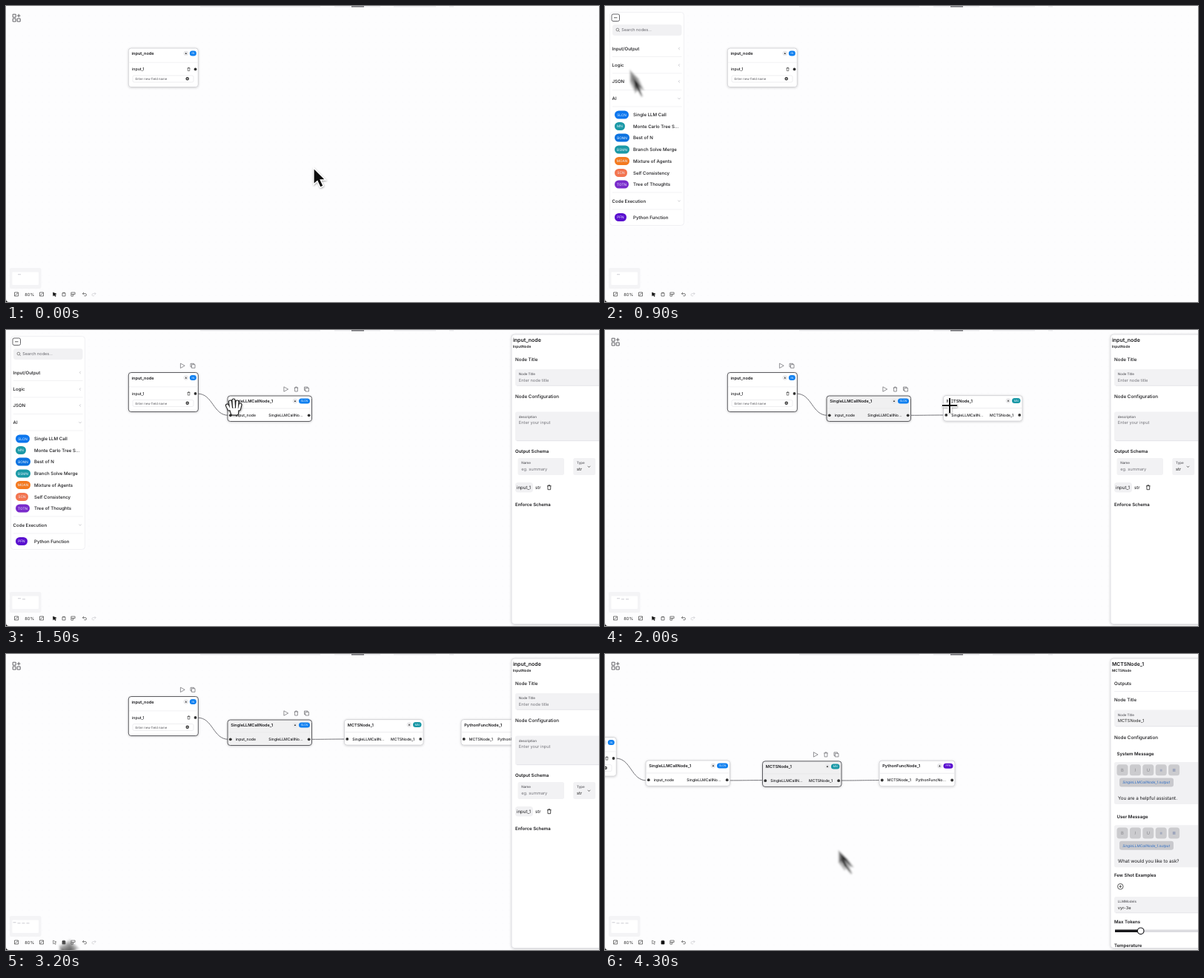
Animation, 800 px wide and 400 px high, one loop 4.4 s. Source, as an HTML page:

```html
<!DOCTYPE html>
<html lang="en">
<head>
<meta charset="utf-8">
<title>Node editor</title>
<style>
html, body { margin: 0; width: 100%; height: 100%; overflow: hidden; background: #fdfdfe; }
svg { display: block; width: 100vw; height: 100vh; }
text { font-family: Inter, "Liberation Sans", sans-serif; text-rendering: geometricPrecision; }
</style>
</head>
<body>
<svg id="stage" viewBox="0 0 800 400" preserveAspectRatio="none"></svg>
<script>
const STEP = 100, STEPS = 44;
const stage = document.getElementById('stage');

// Pointer path: step, shape, x, y
const POINTER = [
  [0, 'arrow', 415, 219], [1, 'arrow', 415, 219], [5, 'arrow', 14, 17], [6, 'arrow', 14, 17],
  [8, 'arrow', 26, 70], [9, 'arrow', 36, 91], [10, 'hand', 40, 138], [11, 'hand', 200, 150],
  [12, 'hand', 415, 160], [13, 'cross', 422, 184], [14, 'hand', 300, 103], [15, 'hand', 296, 92],
  [16, 'hand', 30, 152], [17, 'hand', 455, 90], [18, 'arrow', 14, 17], [19, 'cross', 412, 115],
  [20, 'cross', 465, 102], [21, 'arrow', 400, 90], [24, 'arrow', 14, 17], [25, 'arrow', 14, 17],
  [26, 'arrow', 32, 110], [27, 'hand', 36, 163], [28, 'hand', 40, 215], [29, 'hand', 45, 275],
  [30, 'hand', 330, 200], [31, 'hand', 612, 92], [32, 'arrow', 78, 387], [33, 'hand', 450, 130],
  [34, 'hand', 300, 164], [35, 'hand', 322, 151], [36, 'hand', 370, 150], [40, 'arrow', 440, 230],
  [42, 'arrow', 326, 278], [43, 'arrow', 318, 268]
];
const HOVER = { 10: 0, 16: 1, 27: 5, 29: 7 };
const BLUE = '#1080f0', TEAL = '#1b99a6', INDIGO = '#5a0fcf';
const ITEMS = [
  ['SLCN', 19, '#0b76ee', 'Single LLM Call', 147], ['MN', 14, TEAL, 'Monte Carlo Tree S...', 162.5],
  ['BONN', 20, '#0b72e0', 'Best of N', 178], ['BSMN', 20, TEAL, 'Branch Solve Merge', 194],
  ['MOAN', 20, '#f47a20', 'Mixture of Agents', 209.5], ['SCN', 17, '#f37550', 'Self Consistency', 225.5],
  ['TOTN', 19, '#7a2bcb', 'Tree of Thoughts', 241], ['PFN', 16, INDIGO, 'Python Function', 285.5]
];
const SECTIONS = [['Input/Output', 57.5, 0], ['Logic', 80, 0], ['JSON', 102, 0], ['AI', 125, 1], ['Code Execution', 263.5, 1]];

const ICONS = {
  play: 'M-2.6-3.2L3.2 0L-2.6 3.2Z',
  trash: 'M-2.7-2H2.7M-1-2V-3H1V-2M-2-2L-1.8 3H1.8L2-2',
  copy: 'M-1.6-1.6H3V3H-1.6ZM-1.6 1.5H-3V-3H1.5V-1.6',
  slash: 'M-2.5-2.5H2.5V2.5H-2.5ZM-2 2L2-2',
  palm: 'M-2-1.5V2.5H2V-1.5ZM-1.2-1.5V-2.6M0-1.5V-2.8M1.2-1.5V-2.6',
  frames: 'M-2.6-2.4H2.6V0H-2.6ZM-2.6 0V2.6H0V0',
  undo: 'M-1-2.4L-2.6-.8L-1 .8M-2.6-.8H1Q2.5-.8 2.5 1Q2.5 2.3 1 2.3H-.5',
  redo: 'M1-2.4L2.6-.8L1 .8M2.6-.8H-1Q-2.5-.8-2.5 1Q-2.5 2.3-1 2.3H.5',
  pick: 'M-2-2.5L2.5-.6L.5.3L1.8 2.3L.9 2.8L-.4.9L-1.8 2.1Z',
  left: 'M.8-1.6L-.8 0L.8 1.6', down: 'M-1.7-.8L0 .8L1.7-.8',
  lens: 'M1.8 0A1.9 1.9 0 1 1-2 0A1.9 1.9 0 1 1 1.8 0M1.3 1.4L2.8 2.9',
  plus: 'M-1.8 0H1.8M0-1.8V1.8',
  bin: 'M-1.8-1.4H1.8M-.7-1.4V-2.2H.7V-1.4M-1.4-1.4L-1.2 2.2H1.2L1.4-1.4',
  apps: 'M-5-4.8H-1V-.8H-5ZM-5 1H-1V5H-5ZM1 1H5V5H1ZM3-5.2V-.6M.7-2.9H5.3'
};

const text = (x, y, str, size = 6, weight = 400, fill = '#17171a', more = '') =>
  `<text x="${x}" y="${y}" font-size="${size}" font-weight="${weight}" fill="${fill}" ${more}>${str}</text>`;
const rect = (x, y, w, h, r, fill, more = '') =>
  `<rect x="${x}" y="${y}" width="${w}" height="${h}" rx="${r}" fill="${fill}" ${more}/>`;
const circle = (x, y, r, fill, more = '') => `<circle cx="${x}" cy="${y}" r="${r}" fill="${fill}" ${more}/>`;
const line = (x1, y, x2, color = '#e6e6ea', w = .7) =>
  `<path d="M${x1} ${y}H${x2}" stroke="${color}" stroke-width="${w}"/>`;
const icon = (name, x, y, color = '#444', w = .7, fill = 'none') =>
  `<path d="${ICONS[name]}" transform="translate(${x} ${y})" fill="${fill}" stroke="${color}" stroke-width="${w}" stroke-linejoin="round"/>`;
const pill = (x, y, w, h, color, label, size) => rect(x, y - h / 2, w, h, h / 2, color) +
  text(x + w / 2, y + size * .36, label, size, 400, '#e8f2ff', 'text-anchor="middle"');
const edge = (x1, y1, x2, y2) => {
  const mid = (x1 + x2) / 2;
  return `<path d="M${x1} ${y1}C${mid} ${y1} ${mid} ${y2} ${x2} ${y2}" fill="none" stroke="#66666b" stroke-width=".9"/>`;
};

const DEFS = `<defs>
  <pattern id="dots" width="9" height="9" patternUnits="userSpaceOnUse"><circle cx="4" cy="4" r=".45" fill="#eeeef2"/></pattern>
  <filter id="shadow" x="-20%" y="-40%" width="140%" height="180%"><feDropShadow dx="0" dy=".6" stdDeviation="1.4" flood-opacity=".2"/></filter>
  <filter id="soft" x="-50%" y="-50%" width="200%" height="200%"><feGaussianBlur stdDeviation="1.1"/></filter>
  <filter id="cast" x="-50%" y="-50%" width="200%" height="200%"><feDropShadow dx=".5" dy="1" stdDeviation="1" flood-opacity=".4"/></filter>
</defs>`;

const ARROW = '<path d="M0 0V22L5 17.5L9 26L13 24L9.2 16H16Z" fill="#080808" stroke="#fff" stroke-width="1.3"/>';
const FINGERS = 'M5 15L2.5 10M7.5 13L6.5 5M11.5 12L11 3M15.5 13L16 5M18.5 15L20 9M7.5 15H16L15.5 21H9.5Z';
const HAND = ['#161616', '#fff'].map((c, i) =>
  `<path d="${FINGERS}" fill="${c}" stroke="${c}" stroke-width="${5 - i * 2}" stroke-linecap="round" stroke-linejoin="round"/>`).join('');
const CROSS = ['#fff', '#111'].map((c, i) =>
  `<path d="M-10 0H10M0-10V10" stroke="${c}" stroke-width="${4.6 - i * 2.6}"/>`).join('');
const SHAPES = { arrow: ARROW, hand: HAND, cross: CROSS };

function pointerAt(step) {
  let i = POINTER.length - 1;
  while (POINTER[i][0] > step) i--;
  const [s0, shape, x0, y0] = POINTER[i], [s1, , x1, y1] = POINTER[i + 1] || POINTER[i];
  const u = s1 > s0 ? (step - s0) / (s1 - s0) : 0, k = u * u * (3 - 2 * u);
  return { shape, x: x0 + (x1 - x0) * k, y: y0 + (y1 - y0) * k };
}

function pointer(step) {
  const p = pointerAt(step), q = pointerAt(Math.max(0, step - 1));
  const put = (x, y, more) => `<g transform="translate(${x} ${y})" ${more}>${SHAPES[p.shape]}</g>`;
  const dx = p.x - q.x, dy = p.y - q.y, speed = Math.hypot(dx, dy);
  if (speed < 15 && p.shape === 'hand' || speed < 1 || p.shape === 'cross')
    return put(p.x, p.y, 'filter="url(#cast)"');
  const reach = Math.min(16, speed) / speed;
  const ghosts = [-.5, -.33, -.17, 0, .17, .33, .5].map(k =>
    put(p.x + dx * reach * k, p.y + dy * reach * k, 'opacity=".27"'));
  return `<g filter="url(#soft)">${ghosts.join('')}</g>`;
}

const tools = (right, y, bin = true) => icon('play', right - (bin ? 35 : 21), y, '#66666b') +
  (bin ? icon('trash', right - 21, y, '#66666b') : '') + icon('copy', right - 7, y, '#66666b');

function frame(x, y, w, h, title, tag, tagW, color, { active, gray }) {
  return rect(x, y, w, h, 3.5, gray ? '#f0f0f1' : '#fff',
      `stroke="${active ? '#5c5c61' : '#c6c6cb'}" stroke-width="${active ? 1 : .7}" filter="url(#shadow)"`) +
    text(x + 4.3, y + 9.3, title, 5.55, 600) +
    circle(x + w - (tagW + 7.5), y + 7, 3.3, '#e9e9eb') +
    `<path d="M${x + w - tagW - 8.7} ${y + 8}l1.2-2.3l1.2 2.3z" fill="#333"/>` +
    pill(x + w - tagW - 2.5, y + 7, tagW, 7, color, tag, 3.6);
}

function inputNode(active) {
  const y = active ? 57.5 : 57;
  return frame(165.3, y, 94, active ? 53 : 52.5, 'input_node', 'IN', 9, BLUE, { active }) +
    line(166, y + 19.3, 259, '#ededf0') + text(170, y + 30.4, 'input_1', 5.2, 500) +
    icon('bin', 246.5, y + 28.4, '#333', .6) +
    rect(171, y + 37, 82, 9, 2, '#fff', 'stroke="#e2e2e6" stroke-width=".6"') +
    text(174.5, y + 43, 'Enter new field name', 4.3, 400, '#55555a') +
    circle(244.7, y + 41.3, 2.2, '#333') +
    `<path d="M243.5 ${y + 41.3}h2.4m-1.2-1.2v2.4" stroke="#fff" stroke-width=".5"/>` +
    circle(255.5, y + 28.4, 1.9, '#333') + (active ? tools(259, y - 9.2, false) : '');
}

function linkNode(x, y, w, name, tag, tagW, color, input, output, look) {
  if (look.active) y += .7;
  return frame(x, y, w, 34.5, name, tag, tagW, color, look) +
    line(x + 1, y + 17, x + w - 1, '#e6e6e9') +
    circle(x + 3.8, y + 26.3, 1.9, '#333') + circle(x + w - 3.8, y + 26.3, 1.9, '#333') +
    text(x + 10.8, y + 28.2, input, 5.1, 500) +
    text(x + w - 12, y + 28.2, output, 5.1, 500, '#17171a', 'text-anchor="end"') +
    (look.active ? tools(x + w, y - 9) : '');
}

function graph(s) {
  const pan = Math.min(1, Math.max(0, (s - 32) / 2));
  const early = s < 34, drop = pointerAt(s === 13 ? 12 : Math.min(s, 15));
  const ax = drop.x + 3, ay = drop.y - 3.7;
  let out = rect(-20, -80, 1100, 500, 0, 'url(#dots)');
  if (s >= 13) out += edge(258.5, early ? 86.1 : 85.4, ax + 1, ay + 27);
  if (s === 19) out += edge(409, 115.3, 436, 115);
  if (s >= 20) out += edge(409, 115.3, 460, 115);
  if (s >= 34) out += edge(560, 115.4, 618, 115);
  out += inputNode(s >= 13 && early);
  if (s >= 12) out += linkNode(ax, ay, 113.5, 'SingleLLMCallNode_1', 'SLCN', 15, BLUE,
    'input_node', 'SingleLLMCallNo...', { active: s >= 14 && early, gray: s >= 16 && early });
  if (s >= 17) out += linkNode(456.5, 88.6, 106.5, 'MCTSNode_1', 'MN', 11.5, TEAL,
    'SingleLLMCallN...', 'MCTSNode_1', { active: !early, gray: !early });
  if (s >= 31) out += linkNode(614, 88.6, 102, 'PythonFuncNode_1', 'PFN', 13, INDIGO,
    'MCTSNode_1', 'PythonFuncNo...', { active: s >= 34 && s < 37 });
  return `<g transform="translate(${-244 * pan} ${55.6 * pan})">${out}</g>`;
}

function chrome(s) {
  const hand = s >= 32, marks = s >= 31 ? 4 : s >= 17 ? 3 : s >= 12 ? 2 : 1;
  let out = [[262, 162], [443, 62], [523, 57], [598, 6]].map(([x, w]) => rect(x, 0, w, 1.5, 0, '#ededf0')).join('') +
    rect(466, 0, 17, 1.6, 0, '#77777c') +
    '<path d="M0 396Q0 400 4 400H0Z" fill="#111"/>' +
    rect(5, 354, 42.5, 28, 2, '#f4f4f6') + rect(8.5, 359.5, 35.5, 17.5, 1, '#fff');
  for (let i = 0; i < marks; i++) out += rect((hand ? 9.5 : 16) + i * 6, i ? 363.2 : 362.2, 4, 1.1, 0, '#d2d2d7');
  return out + icon('slash', 14, 389.5) + text(25.3, 391.6, '80%', 5.7, 400, '#333') + icon('slash', 48, 389.5) +
    icon('pick', 65.5, 389.7, hand ? '#555' : '#111', .6, hand ? 'none' : '#111') +
    icon('palm', 78, 389.5, hand ? '#111' : '#444', .7, hand ? '#111' : 'none') +
    icon('frames', 90.5, 389.5) + icon('undo', 106, 389.5) + icon('redo', 118.5, 389.5, '#c9c9cd');
}

function sidebar(s) {
  let out = rect(6.5, 8.5, 100, 288, 4, '#fff', 'stroke="#ececf0" stroke-width=".8"') +
    rect(9, 11, 10.5, 9.5, 2, '#fff', 'stroke="#55555a" stroke-width=".9"') + line(12, 15.8, 16.5, '#333', .8) +
    rect(10, 25, 93.5, 15, 3.5, '#f1f1f3') + icon('lens', 17, 32, '#666') +
    text(22.3, 34.2, 'Search nodes...', 5.5, 400, '#66666c');
  for (const [name, y, open] of SECTIONS)
    out += text(9.6, y + 2.1, name, 6.05, 500) + icon(open ? 'down' : 'left', 100, y, '#aaaab0', .6);
  for (const y of [68.5, 91, 113.5, 136, 252, 275]) out += line(10, y, 103.5, '#ececef');
  ITEMS.forEach(([tag, w, color, name, y], i) => {
    if (HOVER[s] === i) out += rect(10, y - 8, 93.5, 16, 2, '#f1f1f2');
    out += pill(13, y, w, 11, color, tag, 4.7) + text(38, y + 2.2, name, 6.1, 500);
  });
  return out;
}

const field = (x, y, w, h, label, value, muted) => rect(x, y, w, h, 2.5, '#f2f2f4') +
  text(x + 4.8, y + 8.3, label, 4.5, 500, '#55555a') +
  text(x + 4.8, y + 16.8, value, 5.7, 400, muted ? '#77777d' : '#222');

function inputPanel() {
  return text(684, 16, 'input_node', 7, 600) + text(684, 23.6, 'InputNode', 4.8, 600) +
    text(687, 41.5, 'Node Title', 6.2, 500) +
    field(687, 53, 120, 22.5, 'Node Title', 'Enter node title', true) + line(689, 75.2, 800, '#dedee2') +
    text(687, 92, 'Node Configuration', 6.3, 500) +
    field(687, 110.5, 120, 39.5, 'description', 'Enter your input', true) + line(689, 149.7, 800, '#dedee2') +
    text(687, 166, 'Output Schema', 6.05, 600) +
    field(690.5, 173, 62.5, 23, 'Name', 'eg. summary', true) + field(765.3, 173, 30, 23, 'Type', 'str') +
    icon('down', 786.5, 184.7, '#444', .8) +
    rect(687, 206, 24, 13.5, 4, '#f1f1f3') + text(689, 215, 'input_1', 6.1) + text(714, 215, 'str', 6.1) +
    icon('trash', 732.8, 212.7, '#222', .8) + text(687, 238.3, 'Enforce Schema', 6.05, 600);
}

function message(y, title, body) {
  const letters = ['B', 'I', 'U', '≡', '≣'];
  return text(690.6, y, title, 6.05, 600) + rect(687, y + 9.5, 120, 57, 2.5, '#f1f1f3') +
    letters.map((c, i) => rect(690.5 + i * 17.4, y + 12.7, 15, 15, 3.5, '#cbcbce') +
      text(698 + i * 17.4, y + 22.3, c, 5.8, 400, i < 3 ? '#85858a' : '#6f7fa8',
        `text-anchor="middle"${i === 1 ? ' font-style="italic"' : ''}`)).join('') +
    rect(694, y + 31, 73, 12, 3, '#c9c9cd') +
    text(698.3, y + 38.8, 'SingleLLMCallNode_1.output', 4.75, 400, '#2c6cc4', 'font-style="italic"') +
    text(692, y + 60, body, 6.3);
}

function searchPanel() {
  return text(684, 16, 'MCTSNode_1', 6.8, 600) + text(684, 23.6, 'MCTSNode', 4.7, 600) +
    text(687, 41.5, 'Outputs', 6.1, 500) + line(687, 50.5, 800, '#e9e9ec') +
    text(687, 63.8, 'Node Title', 6.1, 500) + field(687, 75.5, 120, 22.5, 'Node Title', 'MCTSNode_1') +
    line(689, 97.8, 800, '#dedee2') + text(687, 114.7, 'Node Configuration', 6.3, 500) +
    message(136.5, 'System Message', 'You are a helpful assistant.') +
    message(221.8, 'User Message', 'What would you like to ask?') +
    text(687, 300.7, 'Few Shot Examples', 6.05, 600) +
    circle(695.3, 314.2, 3.8, 'none', 'stroke="#333" stroke-width=".8"') + icon('plus', 695.3, 314.2, '#333', .8) +
    field(687, 328, 120, 22, 'LLMModels', 'vyr-3e') + line(689, 349.8, 800, '#dedee2') +
    text(687, 363.8, 'Max Tokens', 6.05, 600) +
    line(688, 374.3, 800, '#dcdce0', 3.6) + line(688, 374.3, 722, '#18181b', 3.6) +
    circle(722.7, 374.3, 4.3, '#fff', 'stroke="#222226" stroke-width="1.2"') +
    text(687, 395.6, 'Temperature', 6.05, 600);
}

const panel = s => rect(682, 6, 130, 391.5, 4, '#fff', 'stroke="#d9d9de" stroke-width=".8" filter="url(#shadow)"') +
  (s < 34 ? inputPanel() : searchPanel());

function render(s) {
  const menuOpen = (s >= 6 && s < 18) || (s >= 25 && s < 31);
  stage.innerHTML = DEFS + rect(0, 0, 800, 400, 0, '#fdfdfe') + graph(s) + chrome(s) +
    (s >= 13 ? panel(s) : '') + (menuOpen ? sidebar(s) : icon('apps', 14.2, 16, '#55555a', .9)) + pointer(s);
}

const start = performance.now();
let shown = -1;
function tick() {
  const step = Math.floor((performance.now() - start) / STEP) % STEPS;
  if (step !== shown) render(shown = step);
  requestAnimationFrame(tick);
}
tick();
</script>
</body>
</html>
```
